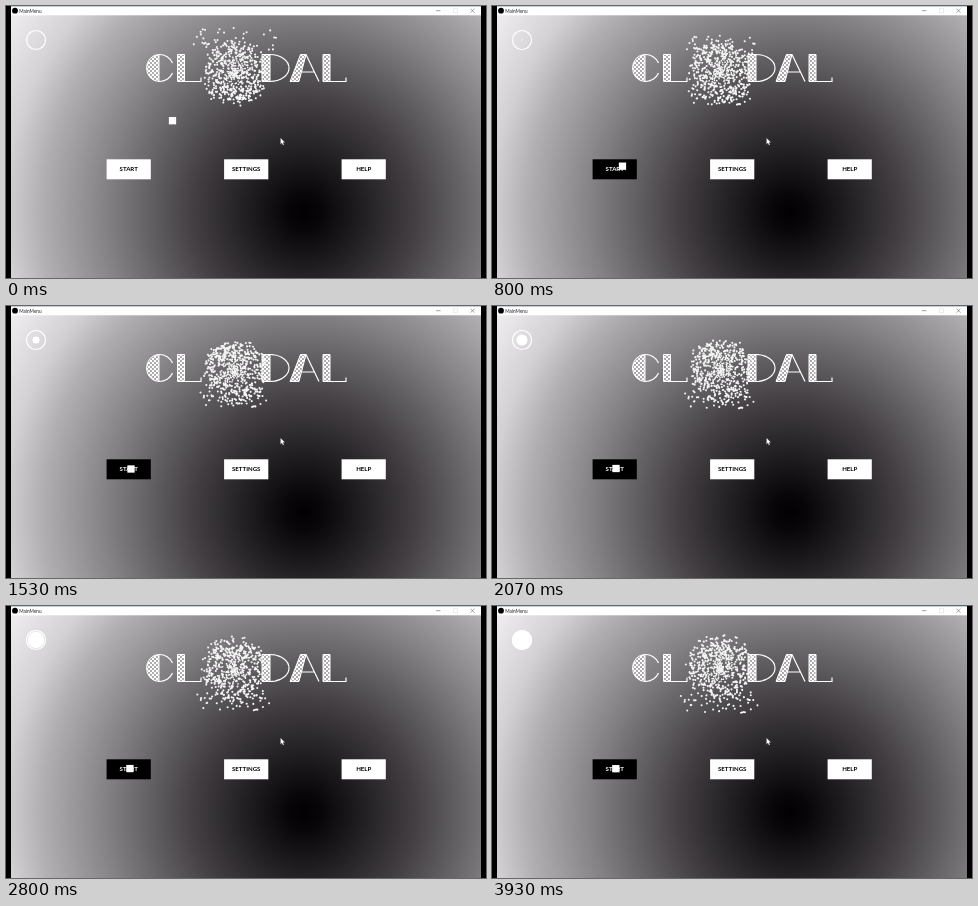
An HTML page for the animation above (3.99 s loop, 480 px wide and 272 px high).

```html
<!DOCTYPE html>
<html lang="en">
<head>
<meta charset="utf-8">
<title>MainMenu</title>
<style>
html, body { margin: 0; width: 100%; height: 100%; overflow: hidden; background: #000; }
svg { display: block; width: 100%; height: 100%; }
text { font-family: Lato, sans-serif; }
.button { font-size: 6.1px; font-weight: 700; text-anchor: middle; }
.thin { fill: none; stroke: #fff; stroke-width: 1.2; }
.dotted { fill: url(#dots); stroke: #fff; stroke-width: 1; }
.swarm { fill: none; stroke: #f4f4f4; stroke-linecap: round; }
</style>
</head>
<body>
<svg viewBox="0 0 480 272">
  <defs>
    <radialGradient id="glow" gradientUnits="userSpaceOnUse" cx="298" cy="206" r="360">
      <stop offset="0" stop-color="#020002"/>
      <stop offset=".05" stop-color="#080608"/>
      <stop offset=".31" stop-color="#433f43"/>
      <stop offset=".55" stop-color="#838183"/>
      <stop offset=".73" stop-color="#b1afb1"/>
      <stop offset=".83" stop-color="#d3d1d3"/>
      <stop offset="1" stop-color="#f3f1f3"/>
    </radialGradient>
    <pattern id="dots" width="4" height="4" patternUnits="userSpaceOnUse">
      <rect width="4" height="4" fill="#fff"/>
      <circle cx="1" cy="1" r=".75" fill="#333"/>
      <circle cx="3" cy="3" r=".75" fill="#333"/>
    </pattern>
  </defs>

  <rect width="480" height="272"/>
  <rect x="5" y="9" width="470" height="263" fill="url(#glow)"/>

  <rect x="5" width="470" height="9.3" fill="#fff"/>
  <rect x="5" width="470" height=".6" fill="#8fb3c4"/>
  <circle cx="9" cy="4.7" r="2.9"/>
  <text x="13.3" y="6.5" font-size="4.7" fill="#222">MainMenu</text>
  <g fill="none" stroke-width=".6">
    <path d="M430 4.7h4.5M464.5 2.7l4 4m0-4l-4 4" stroke="#666"/>
    <path d="M447.5 2.7h4v4h-4z" stroke="#ddd"/>
  </g>

  <circle class="thin" cx="30" cy="34" r="9.5"/>
  <circle id="progress" cx="30" cy="34" fill="#fff"/>

  <g role="img" aria-label="CLODAL">
    <path class="dotted" d="M153 48.5A12.5 13.5 0 0 0 153 75.5z
      M171.5 48.5h7v27h-7z M256 48.5h8v27h-8z
      M284 75.5L294.5 48.5h5.5L293 75.5z M317 48.5h7v27h-7z"/>
    <path class="thin" d="M153 48.5A14 13.5 0 0 1 166.5 57M153 75.5A14 13.5 0 0 0 166.5 67
      M178 75.5h17v-4 M264 48.5A19 13.5 0 0 1 264 75.5
      M300 48.5L313 75.5M295.5 66h13 M324 75.5h16v-4"/>
  </g>
  <path id="fine" class="swarm" stroke-width="1.7"/>
  <path id="coarse" class="swarm" stroke-width="2.1"/>

  <g class="button">
    <rect id="start" x="100.6" y="153.3" width="44.2" height="20"/>
    <text id="startLabel" x="122.7" y="165.4">START</text>
    <rect x="218.1" y="153.3" width="44.2" height="20" fill="#fff"/>
    <text x="240.2" y="165.4">SETTINGS</text>
    <rect x="335.6" y="153.3" width="44.2" height="20" fill="#fff"/>
    <text x="357.7" y="165.4">HELP</text>
  </g>

  <path d="M274.4 131.8v6.6l1.5-1.3 1 2.2 1.2-.5-1-2.2h2z" fill="#fff" stroke="#222" stroke-width=".3"/>
  <rect id="pointer" width="7.3" height="7.3" fill="#fff"/>
</svg>
<script>
const LOOP = 3990, STEP = 200 / 3;
const el = id => document.getElementById(id);
const clamp = v => Math.max(0, Math.min(1, v));
const mix = (a, b, k) => a + (b - a) * k;
const smooth = v => { v = clamp(v); return v * v * (3 - 2 * v); };

let seed = 7;
const random = () => {
  seed = (seed * 1664525 + 1013904223) % 4294967296;
  return seed / 4294967296;
};
const many = (count, make) => Array.from({ length: count }, make);

const core = many(560, () => ({
  angle: random() * 2 * Math.PI, radius: random() ** 0.72, phase: random() * 2 * Math.PI
}));
const above = many(42, () => ({ x: (random() * 2 - 1) * 42, y: -mix(22, 44, random()) }));
const below = many(48, () => ({ x: (random() * 2 - 1) * 43, y: mix(20, 41, random()) }));

// time, x, y of the pointer's centre
const route = [
  [0, 166.5, 114.7], [400, 129.5, 160.5], [1070, 131, 160], [1530, 125, 163],
  [2070, 124, 162.5], [LOOP, 123.8, 162.7]
];

function pointerAt(t) {
  const i = route.findIndex(stop => stop[0] > t);
  const from = route[i - 1], to = route[i];
  const k = smooth((t - from[0]) / (to[0] - from[0]));
  return [mix(from[1], to[1], k), mix(from[2], to[2], k)];
}

const dot = (x, y) => `M${x.toFixed(2)} ${y.toFixed(2)}h0`;

function drawSwarm(t) {
  const k = t / LOOP;
  const cx = mix(229, 228, k), cy = mix(67, 62, k), size = mix(31, 33, k);
  let fine = '', coarse = '';
  for (const p of core) {
    const angle = p.angle + 0.3 * Math.sin(k * 4 + p.phase);
    const r = size * p.radius * (1 + 0.08 * Math.sin(k * 7 + p.phase));
    const mark = dot(cx + r * Math.cos(angle), cy + r * Math.sin(angle));
    if (p.radius < 0.45) fine += mark; else coarse += mark;
  }
  const gather = 1 - 0.45 * smooth((t - 200) / 1400);
  const spread = 0.7 + 0.3 * k ** 0.7;
  for (const p of above) coarse += dot(228.5 + p.x * gather, 66 + p.y * gather);
  for (const p of below) coarse += dot(228.5 + p.x * spread, 66 + p.y * spread);
  el('fine').setAttribute('d', fine);
  el('coarse').setAttribute('d', coarse);
}

function draw(t) {
  const [x, y] = pointerAt(t);
  el('pointer').setAttribute('x', x - 3.65);
  el('pointer').setAttribute('y', y - 3.65);
  const hover = x > 100.6 && x < 144.8 && y > 153.3 && y < 173.3;
  el('start').setAttribute('fill', hover ? '#000' : '#fff');
  el('startLabel').setAttribute('fill', hover ? '#fff' : '#000');
  el('progress').setAttribute('r', 10 * clamp((t - 600) / 2650));
  drawSwarm(t);
}

const began = performance.now();
let shown = -1;
function tick() {
  const t = (performance.now() - began) % LOOP;
  const step = Math.min(59, Math.floor(t / STEP + 0.05));
  if (step !== shown) draw((shown = step) * STEP);
  requestAnimationFrame(tick);
}
tick();
</script>
</body>
</html>
```
